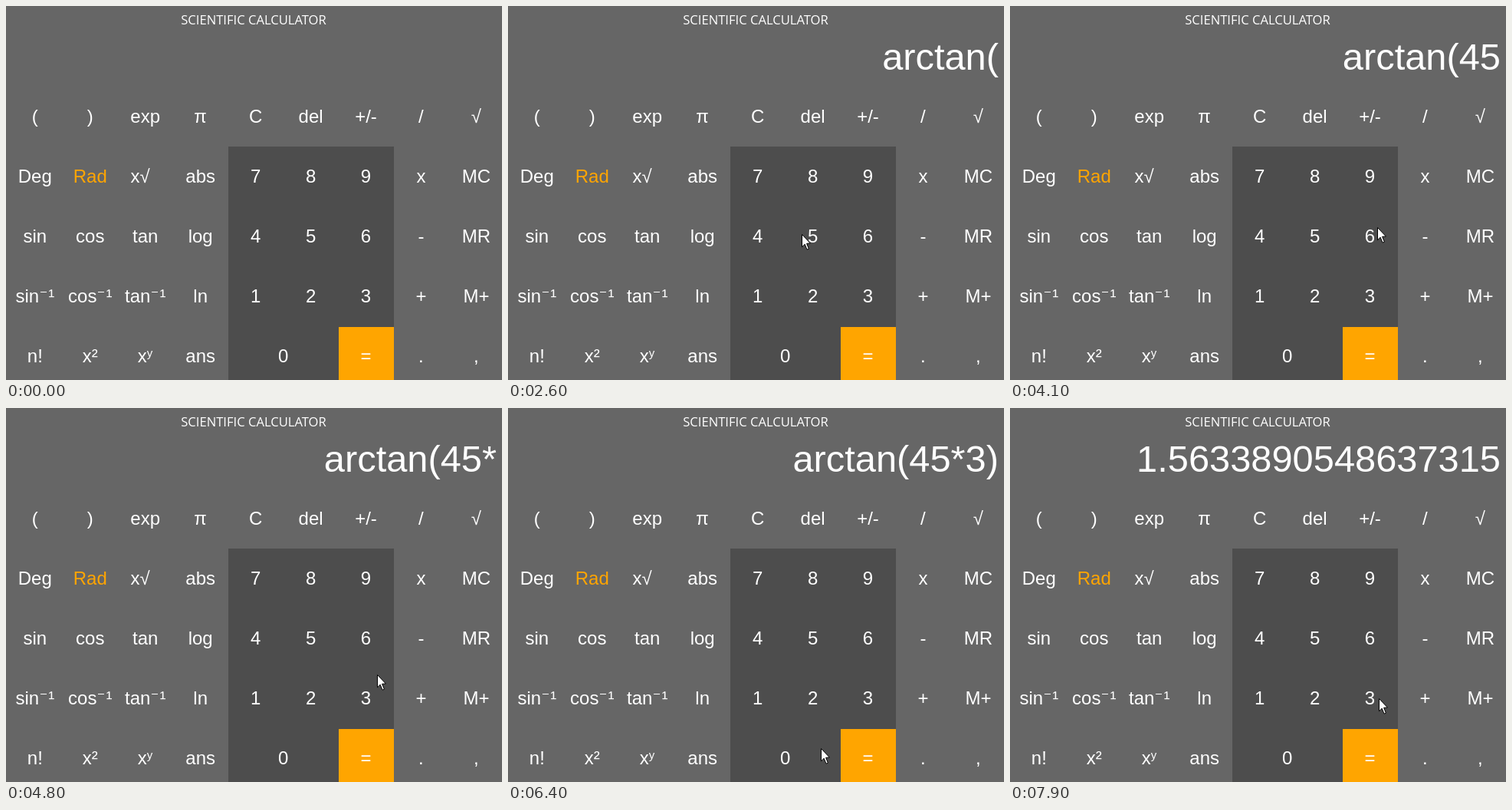
An HTML page with a canvas that plays this animation: 647x487 px, repeating every 8000 ms.

```html
<!DOCTYPE html>
<html lang="en">
<head>
<meta charset="utf-8">
<title>Scientific calculator</title>
<style>
html, body { margin: 0; width: 100%; height: 100%; overflow: hidden; background: #666; }
canvas { display: block; }
</style>
</head>
<body>
<canvas id="stage" width="647" height="487"></canvas>
<script>
const ctx = document.getElementById('stage').getContext('2d');
const LOOP = 8000, STEP = 100;
const SANS = '"Liberation Sans", Arial, sans-serif';
const GREY = '#666666', DARK = '#4d4d4d', ORANGE = '#ffa500', WHITE = '#ffffff';

const ROWS = [
  '( ) exp π C del +/- / √',
  'Deg Rad x√ abs 7 8 9 x MC',
  'sin cos tan log 4 5 6 - MR',
  'sin⁻¹ cos⁻¹ tan⁻¹ ln 1 2 3 + M+',
  'n! x² xʸ ans 0 _ = . ,'
].map(row => row.split(' '));

// [time, x, y] of the pointer tip
const PATH = [
  [300, 400, 396], [600, 198, 378], [700, 184, 376],
  [1500, 184, 376], [1700, 132, 326], [1900, 96, 302],
  [2000, 96, 302], [2500, 392, 297], [2600, 383, 297], [2800, 338, 298],
  [3000, 336, 298], [3600, 383, 294], [3700, 383, 294], [3800, 379, 294],
  [4000, 379, 294], [4100, 479, 288], [4300, 540, 222], [4500, 540, 222],
  [4800, 484, 347], [4900, 477, 372], [5100, 477, 372], [5500, 202, 179],
  [5700, 122, 142], [5800, 112, 140], [6000, 112, 140], [6400, 408, 443],
  [6600, 460, 449], [6700, 463, 452], [7500, 463, 452], [7700, 482, 402],
  [7900, 481, 378]
];

// [time, column, row] of each key flash
const PRESSES = [[1300, 2, 3], [4000, 5, 2], [4400, 7, 1], [5000, 6, 3], [5900, 1, 0], [6800, 6, 4]];

const DISPLAY = [
  [0, ''], [1400, 'arctan('], [3000, 'arctan(4'], [4100, 'arctan(45'],
  [4500, 'arctan(45*'], [5100, 'arctan(45*3'], [6000, 'arctan(45*3)'],
  [6900, '1.5633890548637315']
];

function write(text, x, y, font, color, align) {
  ctx.font = font;
  ctx.fillStyle = color;
  ctx.textAlign = align;
  ctx.fillText(text, x, y);
}

function box(x, y, w, h, color) {
  ctx.fillStyle = color;
  ctx.fillRect(x, y, w, h);
}

function label(text, x, y, color) {
  const font = '24px ' + SANS;
  if (text.endsWith('⁻¹')) {
    const base = text.slice(0, -2);
    ctx.font = font;
    const w = ctx.measureText(base).width;
    const left = x - (w + 20) / 2;
    write(base, left, y, font, color, 'left');
    box(Math.round(left + w + 2), y - 14, 8, 1, color);
    write('¹', left + w + 12, y, font, color, 'left');
  } else if (text === 'xʸ') {
    write('x', x - 10, y, font, color, 'left');
    write('y', x + 2, y - 7, '15px ' + SANS, color, 'left');
  } else {
    write(text, text === 'x√' ? x - 6.5 : x, y, font, color, 'center');
  }
}

function key(col, row, color) {
  const text = ROWS[row][col];
  if (text === '_') return;
  const x = 37.8 + 71.95 * col + (text === '0' ? 36 : 0);
  label(text, x, Math.round(151.6 + 78.2 * row), color);
}

function pointer(x, y) {
  const shape = [[.5, .5], [.5, 16.8], [4.2, 13.2], [7, 20.2], [9.4, 19.2], [6.6, 12.3], [11.4, 12]];
  ctx.beginPath();
  shape.forEach(([dx, dy]) => ctx.lineTo(x + dx, y + dy));
  ctx.closePath();
  ctx.fillStyle = WHITE;
  ctx.fill();
  ctx.strokeStyle = '#000000';
  ctx.lineWidth = 1;
  ctx.stroke();
}

function pointerAt(t) {
  const next = PATH.findIndex(p => p[0] > t);
  if (next === 0) return null;
  if (next < 0) return PATH[PATH.length - 1].slice(1);
  const [t0, x0, y0] = PATH[next - 1], [t1, x1, y1] = PATH[next];
  const k = (t - t0) / (t1 - t0);
  return [Math.round(x0 + (x1 - x0) * k), Math.round(y0 + (y1 - y0) * k)];
}

function draw(t) {
  box(0, 0, 647, 487, GREY);
  box(290, 183, 216, 304, DARK);
  box(434, 418, 72, 69, ORANGE);
  write('SCIENTIFIC CALCULATOR', 323, 24, '16.6px "Open Sans", sans-serif', WHITE, 'center');

  const shown = DISPLAY.filter(d => d[0] <= t).pop()[1];
  write(shown, 640, 83, '48.8px ' + SANS, WHITE, 'right');

  ROWS.forEach((row, r) => row.forEach((text, c) => key(c, r, text === 'Rad' ? ORANGE : WHITE)));

  const press = PRESSES.find(p => p[0] === t);
  if (press) {
    const [, c, r] = press;
    box(2 + 72 * c, 105 + 78 * r, 72, 78, '#f0f0f0');
    key(c, r, '#000000');
  }

  const tip = pointerAt(t);
  if (tip) pointer(...tip);
}

const start = performance.now();
function tick() {
  const t = (performance.now() - start) % LOOP;
  draw(Math.floor(t / STEP) * STEP);
  requestAnimationFrame(tick);
}
tick();
</script>
</body>
</html>
```
